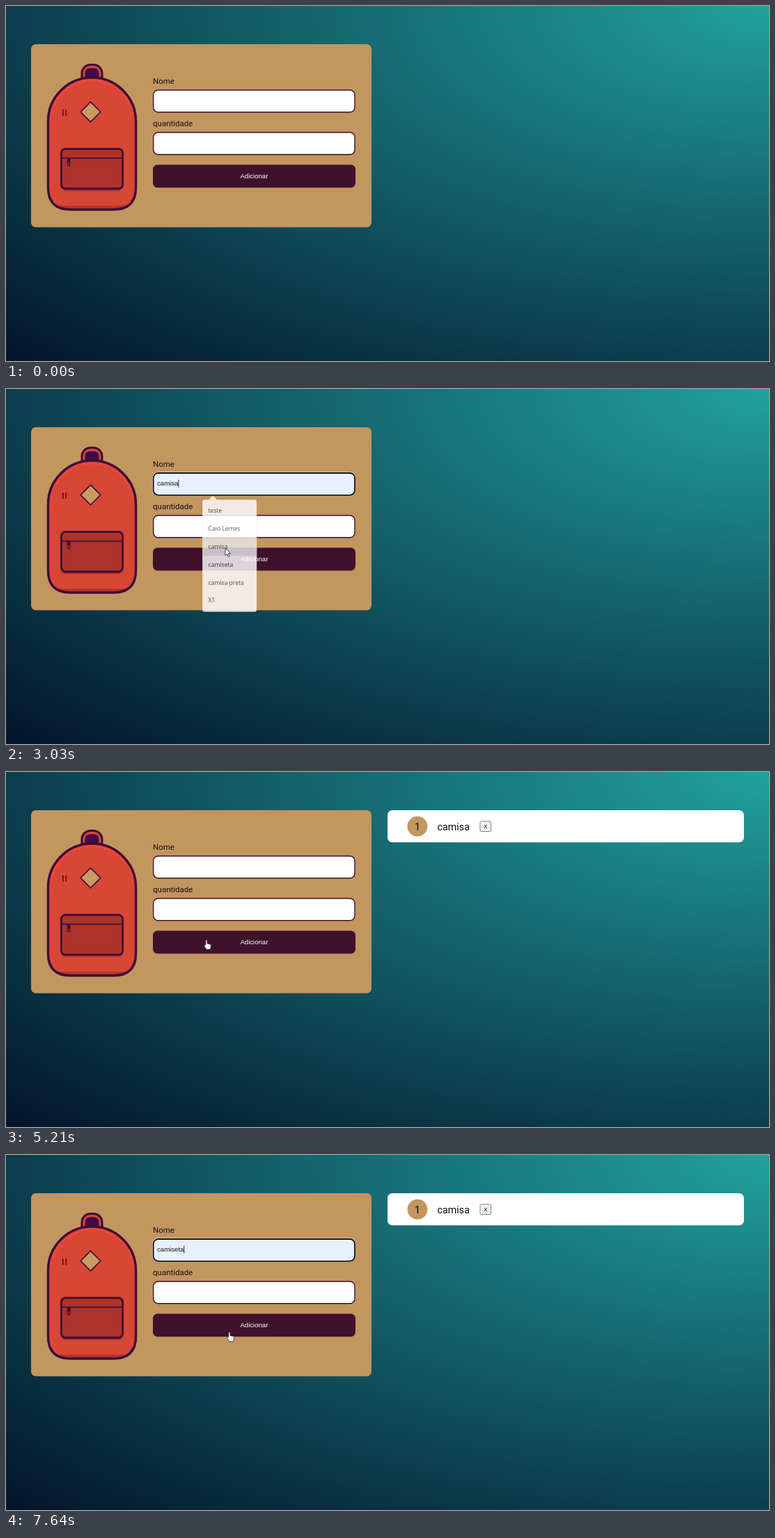
Recreate the animation shown at these times as an HTML page. Size 1096 by 511 pixels, loop 7990 ms.

```html
<!DOCTYPE html>
<html lang="pt-BR">
<head>
<meta charset="utf-8">
<title>Mochila</title>
<style>
  html, body { margin: 0; width: 100%; height: 100%; overflow: hidden; }
  body { background: radial-gradient(ellipse at top right, #21a19d, #03142b); }
  svg { display: block; width: 100%; height: 100%; }
  .label { font: 11.5px Roboto, sans-serif; fill: #161013; }
  .form { font: 9.6px "Liberation Sans", Arial, sans-serif; fill: #161616; }
  .menu { font: 8.6px "Open Sans", sans-serif; fill: #3b3b3b; }
  .tip { font: 8.1px "Open Sans", sans-serif; fill: #575757; }
  .item { font: 14.3px Roboto, sans-serif; fill: #0c0c0c; }
  .mid { text-anchor: middle; }
</style>
</head>
<body>
<svg viewBox="0 0 1096 511" xmlns="http://www.w3.org/2000/svg">
  <rect x="36" y="55" width="489" height="263.5" rx="7" fill="#c3955f"/>

  <g id="bag" stroke="#3d0d38" stroke-linejoin="round">
    <path d="M109 105V97a12.5 12.5 0 0 1 12.500-12.500h4a12.500 12.500 0 0 1 12.500 12.500v8z" fill="#d84635" stroke-width="3"/>
    <path d="M113.500 105V97q0-7.500 7.500-7.500h5q7.500 0 7.500 7.500v8z" fill="#400c47" stroke="none"/>
    <path d="M60.500 166a63 63 0 0 1 126 0v95q0 32-32 32h-62q-32 0-32-32z" fill="#e9463a" stroke="none"/>
    <path d="M64.500 169a59.500 60 0 0 1 119 0v92q0 30-30 30h-59q-30 0-30-30z" fill="#d84635" stroke="none"/>
    <path d="M73 287.500h101q-8 5.500-20 5.500h-62q-12 0-19-5.500z" fill="#b3352b" stroke="none"/>
    <path d="M60.500 166a63 63 0 0 1 126 0v95q0 32-32 32h-62q-32 0-32-32z" fill="none" stroke-width="3.500"/>
    <path d="M81.800 149v9M86.300 149v9" fill="none" stroke-width="1.500"/>
    <path d="M121.500 138.200l14.300 14.300l-14.300 14.300l-14.300-14.300z" fill="#c99b63" stroke-width="1.700"/>
    <rect x="79" y="214" width="89" height="52.500" rx="7" fill="#b3352b" stroke="none"/>
    <rect x="79.400" y="205.700" width="88.200" height="57.300" rx="6" fill="#ad332b" stroke-width="2.800"/>
    <path d="M80 219h87" stroke-width="1.700"/>
    <path d="M88.200 219.500h4v6h-4z" fill="#3d0d38" stroke-width=".6"/>
    <rect x="88.700" y="224.500" width="3" height="5.500" rx="1.500" fill="#ad332b" stroke-width="1.300"/>
  </g>

  <text class="label" x="211" y="112">Nome</text>
  <text class="label" x="211" y="173">quantidade</text>
  <g id="fields"></g>
  <rect x="211" y="228.500" width="291" height="33" rx="6.500" fill="#3f122c"/>
  <text class="form mid" x="356.400" y="248" style="fill:#fff">Adicionar</text>

  <g id="list">
    <rect x="548" y="55" width="512" height="46.300" rx="7" fill="#fff"/>
    <circle cx="591" cy="78.300" r="14.500" fill="#c3955f"/>
    <text class="item mid" x="591" y="83.500">1</text>
    <text class="item" x="619.500" y="83.500">camisa</text>
    <rect x="681" y="70.900" width="15.600" height="14.600" rx="1.500" fill="#efefef" stroke="#767676" stroke-width=".9"/>
    <text class="form mid" x="688.800" y="81">x</text>
  </g>

  <g id="menus"></g>
  <g id="tip">
    <rect x="289.500" y="161.500" width="94" height="18" fill="#fff" stroke="#6b6057"/>
    <text class="tip" x="294.300" y="173.500">Preencha este campo.</text>
  </g>

  <g id="cursor" stroke-linejoin="round">
    <path id="arrow" d="M0 0v10.800l2.500-2.300l1.700 3.900l1.800-.8l-1.700-3.800h3.400z" fill="#fff" stroke="#222" stroke-width=".8"/>
    <path id="beam" d="M-2.500-5q2 0 2.500.8q.5-.8 2.500-.8M0-4.200v8.400M-2.500 5q2 0 2.500-.8q.5.800 2.500.8" fill="none" stroke="#333" stroke-width="1"/>
    <path id="hand" d="M-1.200 7.500V1q0-1.200 1.100-1.200T1 1v4l4 .8q1.600.4 1.500 2l-.6 3.700l-.8 2h-5l-3.300-4.700q-.6-1.200.5-1.700q.7-.2 1.500.4z" fill="#fff" stroke="#222" stroke-width=".8"/>
  </g>
</svg>
<script>
const LOOP = 7990, ROW = 25.87;
const NAMES = ['teste', 'Caio Lemes', 'camisa', 'camiseta', 'camisa preta', 'X1'];

// cursor stops: time, x, y
const PATH = [
  [120, 1009, 500], [400, 700, 375], [640, 425, 240], [870, 379, 140.500], [1580, 379, 140.500],
  [1840, 345, 174], [2060, 345, 174], [2630, 315, 229], [3200, 315, 229], [3400, 289, 205],
  [3570, 289, 205], [3640, 289, 202], [3920, 289, 202], [4110, 292, 228], [4700, 292, 228],
  [4980, 288, 242], [5230, 288, 242], [5640, 284, 151.500], [6500, 284, 151.500], [7020, 321, 255]
];
// suggestion menus: field, opens, picked, picked value
const MENUS = [[0, 980, 2970], [1, 3370, 4380], [0, 6020, 7300]];
const CARET_STARTS = [940, 2830, 3370, 4370, 6030, 7300];

const $ = id => document.getElementById(id);
const clamp = v => Math.max(0, Math.min(1, v));
const within = (t, a, b) => t >= a && t < b;
const show = (el, on) => el.setAttribute('visibility', on ? 'visible' : 'hidden');

const fieldSvg = (i, y) => `
  <rect id="ring${i}" x="210.500" y="${y - 1.5}" width="291.500" height="34.500" rx="8" fill="#fff"/>
  <rect id="box${i}" x="211.700" y="${y}" width="289.300" height="31.800" rx="7"/>
  <text id="text${i}" class="form" x="217" y="${y + 18}"></text>
  <path id="caret${i}" d="M0 ${y + 9.5}v11" stroke="#111" stroke-width=".9"/>`;
$('fields').innerHTML = fieldSvg(0, 121) + fieldSvg(1, 182) +
  '<path id="spin" d="M487.700 196.500l2.700-3.200l2.700 3.200zM487.700 198.800l2.700 3.200l2.700-3.200z" fill="#4a453f"/>';

const menuSvg = (i, top, w, rows) => `<g id="menu${i}">
  <path d="M291 ${top + .5}l6.200-6l6.200 6z" fill="#fff"/>
  <rect x="282" y="${top}" width="${w}" height="${rows.length * ROW + 6.8}" rx="3" fill="#fff" stroke="#000" stroke-opacity=".1" stroke-width=".6"/>
  <rect id="hover${i}" x="282" width="${w}" height="${ROW}" fill="#e8e8ea"/>
  ${rows.map((s, k) => `<text class="menu" x="290.500" y="${top + 3.4 + (k + .5) * ROW + 3}">${s}</text>`).join('')}</g>`;
const LISTS = [
  { top: 159, w: 78.3, rows: NAMES },
  { top: 220.5, w: 34.5, rows: ['1'] }
];
$('menus').innerHTML = LISTS.map((m, i) => menuSvg(i, m.top, m.w, m.rows)).join('');

function cursorAt(t) {
  let k = 0;
  while (k < PATH.length - 1 && PATH[k + 1][0] <= t) k++;
  const a = PATH[k], b = PATH[k + 1] || a;
  const p = b === a ? 0 : clamp((t - a[0]) / (b[0] - a[0]));
  return [a[1] + (b[1] - a[1]) * p, a[2] + (b[2] - a[2]) * p];
}

function drawMenu(i, t, x, y) {
  const m = LISTS[i];
  const open = MENUS.find(([f, from, to]) => f === i && within(t, from, to + 330));
  const alpha = open ? Math.min(clamp((t - open[1]) / 150), 1 - clamp((t - open[2]) / 330)) : 0;
  const row = Math.floor((y - m.top - 3.4) / ROW);
  const over = !!open && within(x, 282, 282 + m.w) && row >= 0 && row < m.rows.length;
  const el = $('menu' + i), s = open && t > open[2] ? .985 + .015 * alpha : 1;
  const cx = 282 + m.w / 2, cy = m.top + m.rows.length * ROW / 2;
  el.setAttribute('opacity', alpha);
  el.setAttribute('transform', `translate(${cx * (1 - s)} ${cy * (1 - s)}) scale(${s})`);
  show($('hover' + i), over);
  $('hover' + i).setAttribute('y', m.top + 3.4 + row * ROW);
  return { over, value: over ? m.rows[row] : '', preview: over && t < open[2] - 140 };
}

function drawField(i, text, focus, preview, t) {
  const start = CARET_STARTS.filter(s => s <= t).pop() || 0;
  const box = $('box' + i);
  show($('ring' + i), focus);
  box.setAttribute('fill', text ? '#e8f0fe' : '#fff');
  box.setAttribute('stroke', focus ? '#101010' : '#3d1030');
  box.setAttribute('stroke-width', focus ? 1.8 : 1.4);
  $('text' + i).textContent = text;
  show($('caret' + i), focus && !preview && (t - start) % 1060 < 530);
  const end = text ? 217.4 + $('text' + i).getComputedTextLength() : 217.4;
  $('caret' + i).setAttribute('transform', `translate(${end} 0)`);
}

function draw(t) {
  const [x, y] = cursorAt(t);
  const a = drawMenu(0, t, x, y), b = drawMenu(1, t, x, y);
  const name = a.value || (within(t, 2970, 5210) ? 'camisa' : t >= 7300 ? 'camiseta' : '');
  const count = b.value || (within(t, 4380, 5210) ? '1' : '');
  const focus = [within(t, 940, 3370) || t >= 6030, within(t, 3370, 5140)];
  drawField(0, name, focus[0], a.preview, t);
  drawField(1, count, focus[1], b.preview, t);

  const inX = within(x, 211, 502), inMenu = a.over || b.over;
  const inCount = inX && within(y, 181, 214);
  const beam = !inMenu && (inCount || inX && within(y, 120, 154));
  const hand = !inMenu && inX && within(y, 228, 262);
  show($('spin'), focus[1] || inCount && !inMenu);
  show($('list'), t >= 5210);
  show($('tip'), within(t, 5830, 6030));

  $('cursor').setAttribute('transform', `translate(${x} ${y})`);
  $('cursor').setAttribute('opacity', t < 120 ? 0 : 1);
  show($('beam'), beam);
  show($('hand'), hand);
  show($('arrow'), !beam && !hand);
}

const begin = performance.now();
function tick() {
  draw((performance.now() - begin) % LOOP);
  requestAnimationFrame(tick);
}
tick();
</script>
</body>
</html>
```
